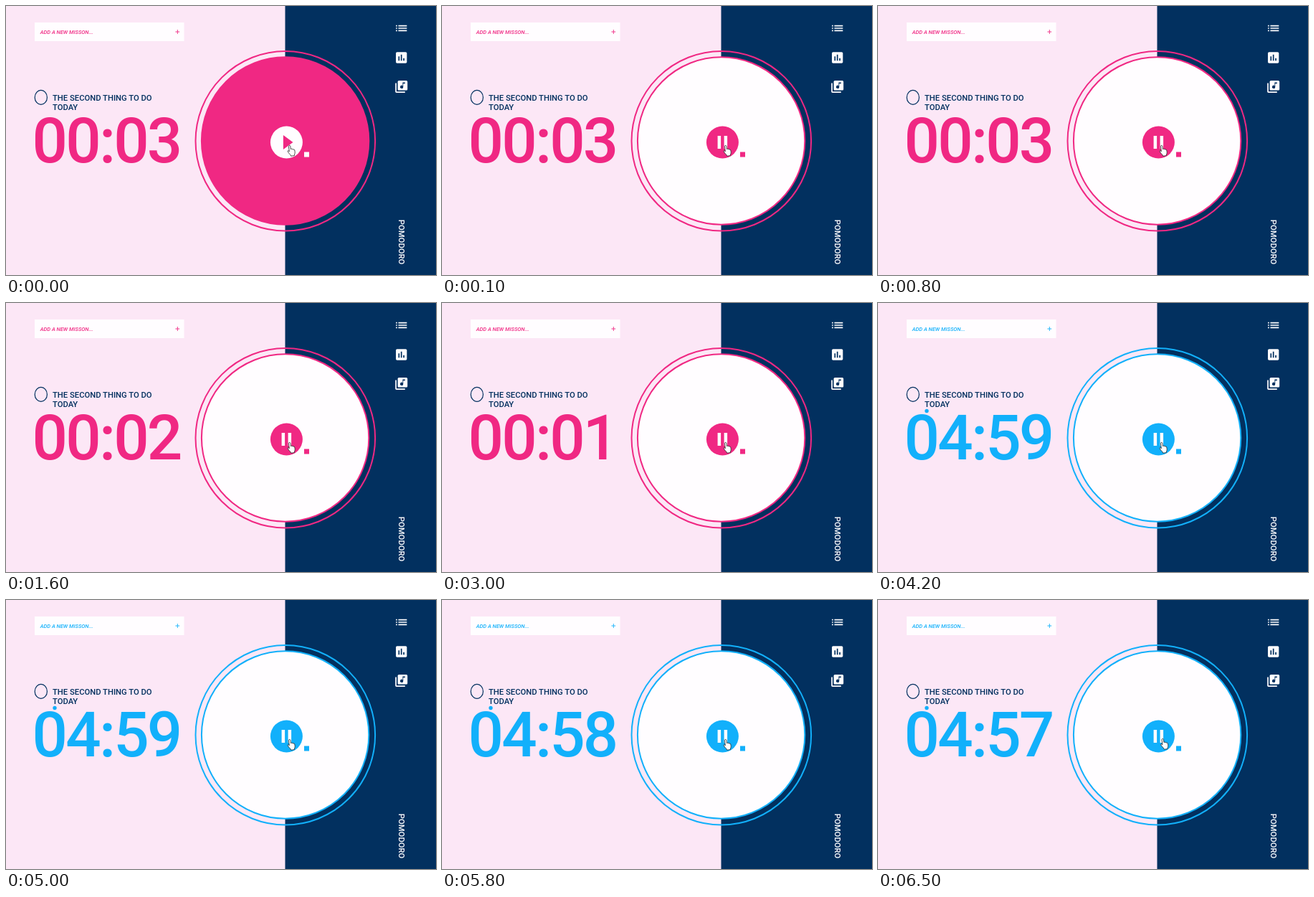
An HTML page for the animation above (6.6 s loop, 600 by 375 pixels).

```html
<!DOCTYPE html>
<html lang="en">
<head>
<meta charset="utf-8">
<title>Pomodoro timer</title>
<style>
  html, body { margin: 0; width: 100%; height: 100%; overflow: hidden; }
  svg { display: block; width: 100vw; height: 100vh; font-family: Roboto, sans-serif; font-weight: 500; }
  .accent { fill: var(--accent); }
  .ring { fill: none; stroke: var(--accent); stroke-width: 2; }
  .label { font-size: 11.25px; }
</style>
</head>
<body>
<svg id="stage" viewBox="0 0 600 375">
  <rect width="600" height="375" fill="#fce7f6"/>
  <rect x="389.5" width="210.5" height="375" fill="#02305f"/>

  <rect x="40" y="23" width="208.5" height="26" fill="#fffdff"/>
  <text class="accent" x="47.7" y="38.8" font-size="7.5" font-style="italic">ADD A NEW MISSON...</text>
  <path d="M236.4 36h5.8M239.3 33v6" stroke="var(--accent)" stroke-width=".9"/>

  <ellipse cx="48.8" cy="127.4" rx="8.6" ry="10" fill="none" stroke="#02305f" stroke-width="1.2"/>
  <g class="label" fill="#02305f">
    <text x="65" y="132">THE SECOND THING TO DO</text>
    <text x="65" y="145.2">TODAY</text>
  </g>
  <circle id="breakDot" class="accent" cx="68" cy="150.5" r="2.7"/>
  <text id="clock" class="accent" x="36.6" y="218.2" font-size="87" letter-spacing="-2.8"></text>

  <circle class="ring" cx="389.8" cy="188.2" r="125.3"/>
  <circle id="disc" cx="389.6" cy="188" r="116.7" stroke="var(--accent)" stroke-width="2"/>
  <circle id="button" cx="391.4" cy="190" r="22.5"/>
  <path id="play" class="accent" d="M386.9 179.9v20.2l13.5-10.1z"/>
  <path id="pause" fill="#fffdff" d="M384.6 181h4.5v18h-4.5zM393.6 181h4.5v18h-4.5z"/>
  <rect id="stop" x="416" y="203.5" width="7" height="7"/>

  <path id="hand" fill="#fff" stroke="#222" stroke-width=".8" stroke-linejoin="round"
    d="M1.6 1.4Q1.9 0 3 .2Q4 .4 4.1 1.6L4.5 5.2Q5.5 4.4 6.4 5.4Q7.5 4.8 8.2 5.9Q9.5 5.5 10 6.8L10.4 9.6Q10.5 11.5 9.7 12.8L9.6 14.4L4.8 15L4.2 13.4Q2.4 11.8 .5 9Q-.2 7.8 .8 7.5Q1.6 7.4 2.5 8.6Z"/>

  <g id="icons" fill="#fffdff" fill-rule="evenodd"></g>
  <text class="label" fill="#fffdff" transform="translate(547.5 297.8) rotate(90)">POMODORO</text>
</svg>
<script>
const LOOP = 6600;
const PINK = '#f02883', BLUE = '#12b0fb', WHITE = '#fffdff';
const START = 100, BREAK = 3500, NUDGE = 6400;
const TICKS = [
  [0, '00:03'], [1500, '00:02'], [2900, '00:01'],
  [BREAK, '05:00'], [3700, '04:59'], [5100, '04:58'], [6500, '04:57']
];
const ICONS = [
  [31, 'M3 13h2v-2H3zM3 17h2v-2H3zM3 9h2V7H3zM7 13h14v-2H7zM7 17h14v-2H7zM7 7v2h14V7z'],
  [72, 'M19 3H5c-1.1 0-2 .9-2 2v14c0 1.1.9 2 2 2h14c1.1 0 2-.9 2-2V5c0-1.1-.9-2-2-2zM9 17H7v-7h2zM13 17h-2V7h2zM17 17h-2v-4h2z'],
  [112.5, 'M20 2H8c-1.1 0-2 .9-2 2v12c0 1.1.9 2 2 2h12c1.1 0 2-.9 2-2V4c0-1.1-.9-2-2-2zm-2 5h-3v5.5a2.5 2.5 0 1 1-1-1.99V5h4zM4 6H2v14c0 1.1.9 2 2 2h14v-2H4z']
];

const el = id => document.getElementById(id);
const show = (id, on) => el(id).setAttribute('visibility', on ? 'visible' : 'hidden');
const fill = (id, color) => el(id).setAttribute('fill', color);

el('icons').innerHTML = ICONS.map(([y, d]) =>
  `<path transform="translate(551.7 ${y}) scale(.85) translate(-12 -12)" d="${d}"/>`).join('');

function render(t) {
  const running = t >= START;
  const onBreak = t >= BREAK;
  const accent = onBreak ? BLUE : PINK;
  el('stage').style.setProperty('--accent', accent);

  const time = TICKS.filter(([at]) => at <= t).pop()[1];
  if (el('clock').textContent !== time) el('clock').textContent = time;

  fill('disc', running ? WHITE : accent);
  fill('button', running ? accent : WHITE);
  fill('stop', running ? accent : WHITE);
  show('play', !running);
  show('pause', running);
  show('breakDot', onBreak);
  el('hand').setAttribute('transform', t >= NUDGE ? 'translate(394.4 193.2)' : 'translate(392.8 194.2)');
}

const origin = performance.now();
function frame() {
  render((performance.now() - origin) % LOOP);
  requestAnimationFrame(frame);
}
render(0);
requestAnimationFrame(frame);
</script>
</body>
</html>
```
